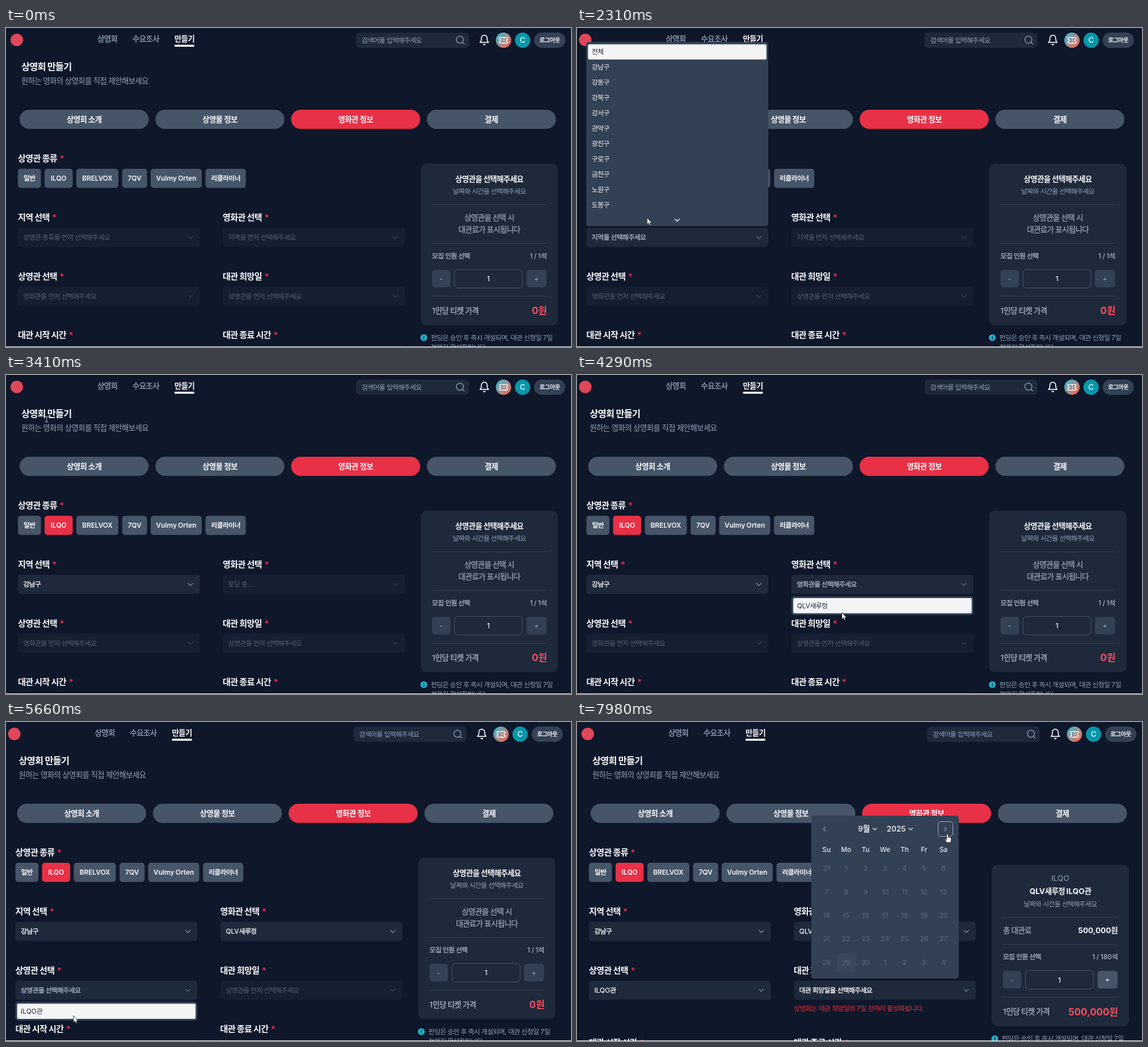
An HTML page with a canvas that plays this animation: 996 by 562 pixels, repeating every 8000 ms.

```html
<!DOCTYPE html>
<html lang="ko">
<head>
<meta charset="utf-8">
<style>
html, body { margin: 0; width: 100%; height: 100%; overflow: hidden; background: #0f172a; }
canvas { display: block; }
</style>
</head>
<body>
<canvas id="stage" width="996" height="562"></canvas>
<script>
const ctx = document.getElementById('stage').getContext('2d');
const LOOP = 8000;
const FAMILY = 'Inter, "Noto Sans CJK KR", sans-serif';
const BG = '#0f172a', CARD = '#1e293b', SLATE = '#334155', CHIP = '#475569';
const MUTED = '#94a3b8', WHITE = '#f8fafc', RED = '#e83046', PRICE = '#fb4f60';
const SMALL = 11.83, BASE = 13.5, LABEL = 15.2;

const FORMAT = 'ILQO', CINEMA = 'QLV새루정', SCREEN = FORMAT + '관';
const DISTRICTS = ['전체', '강남구', '강동구', '강북구', '강서구', '관악구', '광진구', '구로구', '금천구', '노원구', '도봉구'];
const CHIPS = [['일반', 21, 40.5], [FORMAT, 68, 49.5], ['BRELVOX', 124, 74], ['7QV', 204.7, 44],
  ['Vulmy Orten', 255, 90], ['리클라이너', 351.7, 71]];

// Moments of the interaction, in ms
const PICK_FORMAT = 1580, PICK_DISTRICT = 2940, LOADED = 3560, PICK_CINEMA = 4710, PICK_SCREEN = 5820;
const MENUS = { district: [2130, PICK_DISTRICT], cinema: [3820, PICK_CINEMA], screen: [5340, PICK_SCREEN] };
const CALENDAR = 6980;

// Pointer path: time, x, y
const PATH = [
  [140, 878, 533], [360, 520, 400], [560, 215, 272], [720, 141, 246], [890, 33, 268], [1300, 33, 268],
  [1520, 92, 268], [1620, 92, 268], [2010, 130, 361], [2180, 130, 361], [2640, 86, 174], [2900, 69, 76],
  [3400, 69, 76], [3630, 470, 363], [3930, 470, 363], [4240, 467, 419], [4340, 467, 419], [4600, 462, 408],
  [4740, 462, 408], [5200, 150, 470], [5340, 150, 470], [5500, 120, 507], [5650, 119, 518], [5880, 119, 518],
  [6290, 185, 474], [6480, 185, 474], [6900, 540, 472], [7010, 540, 472], [7260, 543, 416], [7300, 543, 416],
  [7680, 662, 250], [7960, 653, 197], [8000, 653, 197]
];

function pointerAt(t) {
  if (t < PATH[0][0]) return null;
  const last = PATH.length - 1;
  let i = PATH.findIndex(key => key[0] > t) - 1;
  if (i < 0) i = last - 1;
  const a = PATH[i], b = PATH[i + 1], span = b[0] - a[0], u = (t - a[0]) / span;
  const speed = (k, axis) => {
    const p = PATH[Math.max(k - 1, 0)], c = PATH[k], n = PATH[Math.min(k + 1, last)];
    const rests = (m) => m !== c && m[1] === c[1] && m[2] === c[2];
    return rests(p) || rests(n) ? 0 : (n[axis] - p[axis]) / (n[0] - p[0]);
  };
  const [x, y] = [1, 2].map(axis => {
    const u2 = u * u, u3 = u2 * u;
    return (2 * u3 - 3 * u2 + 1) * a[axis] + (3 * u2 - 2 * u3) * b[axis]
      + span * ((u3 - 2 * u2 + u) * speed(i, axis) + (u3 - u2) * speed(i + 1, axis));
  });
  return { x, y };
}

const inside = (p, x, y, w, h) => !!p && p.x >= x && p.x < x + w && p.y >= y && p.y < y + h;

function box(x, y, w, h, r, fill, stroke) {
  ctx.beginPath();
  ctx.roundRect(x, y, w, h, r);
  if (fill) { ctx.fillStyle = fill; ctx.fill(); }
  if (stroke) { ctx.strokeStyle = stroke; ctx.lineWidth = 1; ctx.stroke(); }
}

function disc(x, y, r, fill) {
  ctx.beginPath();
  ctx.arc(x, y, r, 0, Math.PI * 2);
  ctx.fillStyle = fill;
  ctx.fill();
}

// Hangul runs are set tighter than Latin ones; y is the optical centre. Returns the right edge.
function text(str, x, y, size, color, weight = 400, align = 0) {
  ctx.font = `${weight} ${size}px ${FAMILY}`;
  ctx.fillStyle = ctx.strokeStyle = color;
  ctx.lineWidth = 0.35;
  const runs = str.match(/[가-힣 ]+|[^가-힣 ]+/g).map(run => {
    const hangul = /[가-힣 ]/.test(run);
    const spacing = hangul ? `${-0.05 * size}px` : '0px';
    ctx.letterSpacing = spacing;
    return { run, hangul, spacing, width: ctx.measureText(run).width };
  });
  x -= align * runs.reduce((sum, r) => sum + r.width, 0);
  for (const r of runs) {
    ctx.letterSpacing = r.spacing;
    ctx.fillText(r.run, x, y + size * 0.37);
    // The Hangul font has no medium weight, so a hairline thickens it
    if (weight === 500 && r.hangul) ctx.strokeText(r.run, x, y + size * 0.37);
    x += r.width;
  }
  return x;
}
const centered = (str, x, y, size, color, weight) => text(str, x, y, size, color, weight, 0.5);
const rightText = (str, x, y, size, color, weight) => text(str, x, y, size, color, weight, 1);

function icon(d, x, y, scale, color, width = 2, fill) {
  const path = new Path2D(d);
  ctx.save();
  ctx.translate(x, y);
  ctx.scale(scale, scale);
  ctx.lineWidth = width;
  ctx.lineCap = ctx.lineJoin = 'round';
  ctx.strokeStyle = color;
  if (fill) { ctx.fillStyle = fill; ctx.fill(path); }
  ctx.stroke(path);
  ctx.restore();
}
const chevron = (x, y, color, turn = 0, size = 4) => {
  ctx.save();
  ctx.translate(x, y);
  ctx.rotate(turn);
  icon('M-1 -.5L0 .5L1 -.5', 0, 0, size, color, 1.2 / size);
  ctx.restore();
};

function header() {
  disc(19, 21, 11, '#e0475b');
  text('상영회', 161, 19.5, BASE, MUTED, 500);
  text('수요조사', 223, 19.5, BASE, MUTED, 500);
  text('만들기', 297, 19.5, BASE, WHITE, 700);
  box(297, 29.5, 35, 3.4, 1, WHITE);
  box(617, 8, 199, 27, 7, CARD);
  text('검색어를 입력해주세요', 627, 21.5, SMALL, MUTED);
  icon('M19 11a8 8 0 1 1-16 0a8 8 0 1 1 16 0M21 21l-4.3-4.3', 791.5, 12, 0.78, MUTED, 1.7);
  icon('M6 8a6 6 0 0 1 12 0c0 7 3 9 3 9H3s3-2 3-9M10.3 21a1.94 1.94 0 0 0 3.4 0', 833, 11, 0.845, WHITE);
  const blend = ctx.createLinearGradient(867, 12, 887, 31);
  blend.addColorStop(0, '#48b4c4');
  blend.addColorStop(1, '#ee6a5c');
  disc(877, 21.5, 13.5, blend);
  icon('M2 9a3 3 0 0 1 0 6v2a2 2 0 0 0 2 2h16a2 2 0 0 0 2-2v-2a3 3 0 0 1 0-6V7a2 2 0 0 0-2-2H4a2 2 0 0 0-2 2ZM13 5v2M13 17v2M13 11v2',
    868.4, 13, 0.72, WHITE);
  disc(910.7, 21.5, 13.5, '#0797aa');
  centered('C', 910.7, 21.5, BASE, WHITE, 500);
  box(931, 8, 55, 27, 13.5, SLATE);
  centered('로그아웃', 958.5, 21.5, 10.3, WHITE, 500);
}

function label(str, x, y) {
  const end = text(str, x, y, LABEL, WHITE, 700);
  text('*', end + 4.5, y, LABEL, RED, 600);
}

// kind: 'off' is disabled, 'hint' is an enabled placeholder, 'set' holds a value
function select(x, y, str, kind) {
  ctx.save();
  if (kind === 'off') ctx.globalAlpha = 0.5;
  box(x, y, 320.7, 33.8, 5, CARD);
  const color = { off: MUTED, hint: '#a9b5c6', set: WHITE }[kind];
  text(str, x + 9.5, y + 16.7, SMALL, color, kind === 'off' ? 400 : 500);
  ctx.globalAlpha *= kind === 'set' ? 0.85 : 0.55;
  chevron(x + 304, y + 17, MUTED);
  ctx.restore();
}

function form(t, pointer) {
  text('상영회 만들기', 27, 67.5, 16.4, WHITE, 700);
  text('원하는 영화의 상영회를 직접 제안해보세요', 27, 93, BASE, MUTED);
  ['상영회 소개', '상영물 정보', '영화관 정보', '결제'].forEach((step, i) => {
    const x = 24 + i * 239.3;
    box(x, 144, 227.5, 33.8, 16.9, i === 2 ? RED : CHIP);
    centered(step, x + 113.7, 160.7, BASE, WHITE, 600);
  });

  label('상영관 종류', 21, 229);
  CHIPS.forEach(([name, x, w], i) => {
    ctx.globalAlpha = inside(pointer, x, 248, w, 34) ? 0.8 : 1;
    box(x, 248, w, 33.8, 5, i === 1 && t >= PICK_FORMAT ? RED : CHIP);
    ctx.globalAlpha = 1;
    centered(name, x + w / 2, 265, SMALL, WHITE, 600);
  });

  label('지역 선택', 21, 333);
  if (t < PICK_FORMAT) select(21, 352, '상영관 종류를 먼저 선택해주세요', 'off');
  else if (t < PICK_DISTRICT) select(21, 352, '지역을 선택해주세요', 'hint');
  else select(21, 352, '강남구', 'set');

  label('영화관 선택', 382, 333);
  if (t < PICK_DISTRICT) select(382.3, 352, '지역을 먼저 선택해주세요', 'off');
  else if (t < LOADED) select(382.3, 352, '로딩 중...', 'off');
  else if (t < PICK_CINEMA) select(382.3, 352, '영화관을 선택해주세요', 'hint');
  else select(382.3, 352, CINEMA, 'set');

  label('상영관 선택', 21, 437);
  if (t < PICK_CINEMA) select(21, 455.7, '영화관을 먼저 선택해주세요', 'off');
  else if (t < PICK_SCREEN) select(21, 455.7, '상영관을 선택해주세요', 'hint');
  else select(21, 455.7, SCREEN, 'set');

  const done = t >= PICK_SCREEN, drop = done ? 24 : 0;
  label('대관 희망일', 382, 437);
  select(382.3, 455.7, done ? '대관 희망일을 선택해주세요' : '상영관을 먼저 선택해주세요', done ? 'set' : 'off');
  if (done) text('상영회는 대관 희망일의 7일 전까지 활성화됩니다.', 382, 504.5, SMALL, RED);

  label('대관 시작 시간', 21, 540.5 + drop);
  label('대관 종료 시간', 382, 540.5 + drop);
  [21, 382.3].forEach(x => select(x, 559.5 + drop, ' ', 'off'));
}

function panel(t) {
  const done = t >= PICK_SCREEN, mid = 852;
  const rule = y => { ctx.fillStyle = SLATE; ctx.fillRect(751, y, 202, 1); };
  ctx.save();
  if (done) ctx.translate(0, 12.5);
  box(731, 239, 242, 284.5, 10, CARD);
  if (done) {
    centered(FORMAT, mid, 262.5, BASE, MUTED);
    centered(`${CINEMA} ${SCREEN}`, mid, 286, BASE, WHITE, 700);
    centered('날짜와 시간을 선택해주세요', mid, 308, SMALL, MUTED);
    rule(331);
    text('총 대관료', 751, 355, BASE, MUTED, 500);
    rightText('500,000원', 953, 355, BASE, WHITE, 700);
  } else {
    centered('상영관을 선택해주세요', mid, 266, BASE, WHITE, 700);
    centered('날짜와 시간을 선택해주세요', mid, 288, SMALL, MUTED);
    rule(311);
    centered('상영관을 선택 시', mid, 334.5, BASE, MUTED, 500);
    centered('대관료가 표시됩니다', mid, 355, BASE, MUTED, 500);
  }
  rule(379);
  text('모집 인원 선택', 751, 401.5, SMALL, '#a9b5c6', 500);
  rightText(done ? '1 / 180석' : '1 / 1석', 953, 401.5, SMALL, '#a9b5c6', 500);
  box(751, 426, 32.5, 31, 5, SLATE);
  centered('-', 767, 442, SMALL, MUTED, 500);
  box(790.5, 425.5, 120, 32.5, 6, null, CHIP);
  centered('1', 850.5, 441.7, SMALL, WHITE, 500);
  box(917.5, 426, 35.5, 31, 5, done ? CHIP : SLATE);
  centered('+', 935, 441.5, SMALL, done ? WHITE : MUTED, 500);
  rule(472);
  text('1인당 티켓 가격', 751, 498, BASE, '#a9b5c6', 500);
  rightText(done ? '500,000원' : '0원', 953, 498, 16.9, PRICE, 700);
  disc(736.5, 545.5, 6, '#22b0ca');
  centered('i', 736.5, 545.5, 9, BG, 700);
  text('펀딩은 승인 후 즉시 개설되며, 대관 신청일 7일', 749, 545.5, SMALL, MUTED);
  text('전까지 활성화됩니다', 749, 563, SMALL, MUTED);
  ctx.restore();
}

// Fades and grows in around (cx, cy), fades out after closing
function popup(t, open, close, cx, cy, draw) {
  if (t < open || t > close + 80) return;
  const level = t < close ? Math.min(1, (t - open + 20) / 120) : 1 - (t - close) / 80;
  const scale = 0.95 + 0.05 * level;
  ctx.save();
  ctx.globalAlpha = level;
  ctx.translate(cx, cy);
  ctx.scale(scale, scale);
  ctx.translate(-cx, -cy);
  draw();
  ctx.restore();
}

function menuItem(x, y, str, active) {
  if (active) box(x + 3.3, y - 13.3, 314.6, 26.8, 2, '#f3f4f6');
  text(str, x + 9.8, y, SMALL, active ? CARD : WHITE);
}

function singleMenu(t, [open, close], x, y, str) {
  popup(t, open, close, x + 160, y, () => {
    box(x, y, 321, 33, 5, SLATE);
    menuItem(x, y + 16.5, str, true);
  });
}

function menus(t) {
  popup(t, ...MENUS.district, 181, 349, () => {
    box(20.5, 24.5, 321, 324.5, 5, SLATE);
    const p = pointerAt(Math.min(t, PICK_DISTRICT) - 45);
    const active = p.y > 326 ? 0 : Math.max(0, Math.floor((p.y - 28.5) / 27));
    DISTRICTS.forEach((name, i) => menuItem(20.5, 42 + i * 27, name, i === active));
    chevron(181, 338.5, WHITE);
  });
  singleMenu(t, MENUS.cinema, 382.3, 389.7, CINEMA);
  singleMenu(t, MENUS.screen, 20.7, 493, SCREEN);
}

function calendar(t, pointer) {
  popup(t, CALENDAR, LOOP, 543, 452, () => {
    box(413, 165, 260, 287, 5, SLATE);
    chevron(436, 188.5, MUTED, Math.PI / 2, 3.4);
    text('9월', 495.5, 188.5, BASE, WHITE, 500);
    chevron(525, 188.5, WHITE, 0, 3.4);
    text('2025', 546, 188.5, BASE, WHITE, 500);
    chevron(588, 188.5, WHITE, 0, 3.4);
    if (inside(pointer, 636, 175, 27, 27)) box(636.5, 175.5, 26, 26, 5, null, '#a3b0c2');
    chevron(649.5, 188.5, MUTED, -Math.PI / 2, 3.4);
    const column = i => 440 + i * 34.35;
    ['Su', 'Mo', 'Tu', 'We', 'Th', 'Fr', 'Sa'].forEach((day, i) => centered(day, column(i), 225, SMALL, '#e2e8f0', 500));
    for (let i = 0; i < 35; i++) {
      const y = 258 + Math.floor(i / 7) * 41.3;
      const day = i === 0 ? 31 : (i - 1) % 30 + 1;
      if (i === 29) box(458, 407, 34, 34, 5, '#39475b');
      centered(String(day), column(i % 7), y, SMALL, '#566479', 500);
    }
  });
}

const menuOpen = t => Object.values(MENUS).some(([open, close]) => t >= open && t < close);

function cursor(t, p) {
  if (!p) return;
  const overSelect = (x, y, from) => t >= from && inside(p, x, y, 321, 33.5);
  const hand = !menuOpen(t) && (
    CHIPS.some(([, x, w]) => inside(p, x, 248, w, 34))
    || overSelect(21, 352, PICK_FORMAT) || overSelect(382, 352, LOADED)
    || overSelect(21, 456, PICK_CINEMA) || overSelect(382, 456, PICK_SCREEN)
    || t >= CALENDAR && inside(p, 636, 175, 27, 27));
  if (hand) {
    icon('M-1.5 1.2Q0-.8 1.5 1.2V6L5 6.7Q7.3 7.2 7.2 9.5L6 16H-1L-4.5 10.5Q-5 8.6-3.2 9L-1.5 10.5Z',
      p.x, p.y, 0.97, '#111827', 1, '#fff');
  } else if (!menuOpen(t) && inside(p, 27, 58, 225, 42)) {
    icon('M-2.5-5Q0-5 0-4Q0-5 2.5-5M0-4V4M-2.5 5Q0 5 0 4Q0 5 2.5 5', p.x, p.y, 1, '#cbd5e1', 1);
  } else {
    icon('M0 0V11.5L2.7 9L4.5 13L6.4 12.2L4.7 8.3H8.2Z', p.x, p.y, 1, '#111827', 0.8, '#fff');
  }
}

function draw(now) {
  const t = now % LOOP, pointer = pointerAt(t);
  ctx.fillStyle = BG;
  ctx.fillRect(0, 0, 996, 562);
  ctx.save();
  // The page slides left while a menu locks scrolling
  if (menuOpen(t)) ctx.translate(-4.4, 0);
  header();
  form(t, pointer);
  panel(t);
  menus(t);
  calendar(t, pointer);
  ctx.restore();
  cursor(t, pointer);
  ctx.fillStyle = '#f4f4f6';
  ctx.fillRect(0, 561, 996, 1);
}

const start = performance.now();
(function tick() {
  draw(performance.now() - start);
  requestAnimationFrame(tick);
})();
</script>
</body>
</html>
```
